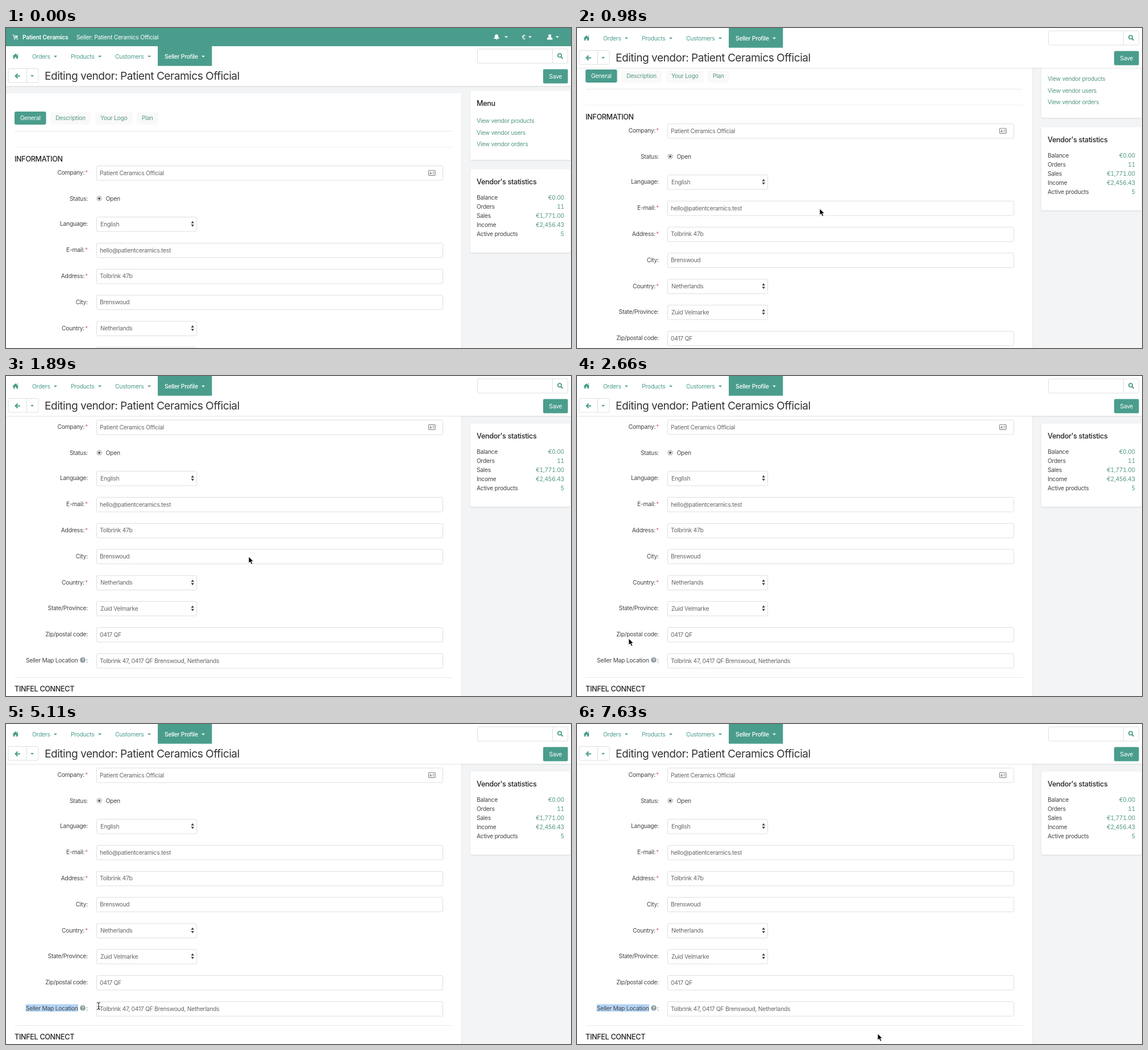
These frames come from a looping animation (994x563 px, 7.7 s). An HTML page:

```html
<!DOCTYPE html>
<html lang="en">
<head>
<meta charset="utf-8">
<title>Editing vendor</title>
<style>
  html, body { margin: 0; width: 100%; height: 100%; overflow: hidden; background: #f2f4f5; }
  svg { display: block; width: 100vw; height: 100vh; }
  text { font: 10.3px Inter, "Open Sans", sans-serif; letter-spacing: -.026em; fill: #444; white-space: pre; }
  .green { fill: #4a9d8c; }
  .link { fill: #559884; }
  .white { fill: #fff; }
  .value { fill: #666; }
  .number { font-variant-numeric: tabular-nums; }
  .medium { font-weight: 500; }
  .bold { font-weight: 600; }
  .heading { font-size: 12.6px; font-weight: 500; fill: #222; }
  .title { font-size: 19.1px; fill: #333; }
  .star { fill: #c77; }
  .box { fill: #fff; stroke: #dcdfe0; }
  .rule { stroke: #e6e8e9; }
  .card { fill: #fff; filter: drop-shadow(0 1px 1px #0000001c); }
</style>
</head>
<body>
<svg viewBox="0 0 994 563" preserveAspectRatio="none">
  <g id="page"></g>
  <g id="bar"></g>
  <g id="cursor">
    <circle id="press" cx=".3" cy=".3" r="26.7" fill="none" stroke="#111" stroke-width="1.4"/>
    <path id="arrow" d="M0 0V11.2L2.6 8.8L4.6 13.2L6.6 12.3L4.7 8.1H8.2Z" fill="#000" stroke="#fff" stroke-width=".7"/>
    <path id="beam" d="M-3-6Q0-6 0-4Q0-6 3-6M0-4V4M-3 6Q0 6 0 4Q0 6 3 6M-1.5 1.5H1.5" fill="none" stroke="#222" stroke-width="1.1"/>
    <path id="hand" d="M-1.4 0Q0-1.8 1.4 0V5L6 6Q7.7 6.5 7.4 8.5L6.4 14.5H-.4L-3.8 9.5Q-4.4 7.6-2.8 7.8L-1.4 9Z" fill="#fff" stroke="#111" stroke-width="1.1"/>
  </g>
</svg>
<script>
const LOOP = 7700, STEP = 70, BAR_SHIFT = 32;
const $ = id => document.getElementById(id);

const text = (x, y, str, cls = '', anchor = 'start') =>
  `<text x="${x}" y="${y}" class="${cls}" text-anchor="${anchor}">${str}</text>`;
const rect = (x, y, w, h, attrs, r = 0) =>
  `<rect x="${x}" y="${y}" width="${w}" height="${h}" rx="${r}" ${attrs}/>`;
const path = (d, attrs) => `<path d="${d}" ${attrs}/>`;
const caret = (x, y, fill) => path(`M${x - 3} ${y - 1.5}h6l-3 3z`, `fill="${fill}"`);
const rule = (y, x1 = 15, x2 = 784) => path(`M${x1} ${y}H${x2}`, 'class="rule"');

const GREEN = '#4a9d8c';
const brand = 'Patient Ceramics', vendor = brand + ' Official';

function field(label, y, value, { required, select } = {}) {
  const star = required ? '<tspan class="star" dx="1">*</tspan>' : '';
  return text(143.8, y + 3, label + ':' + star, '', 'end')
    + rect(159.5, y - 12.5, select ? 176 : 609, 25.5, 'class="box"', 2)
    + text(select ? 166 : 165, y + 3.5, value, 'value')
    + (select ? path(`M325.5 ${y - 1.4}h5.4l-2.7-4zM325.5 ${y + .8}h5.4l-2.7 4z`, 'fill="#444"') : '');
}

function buildPage() {
  const tabs = [['Description', 78, 71], ['Your Logo', 157, 65.5], ['Plan', 230, 37.5]];
  const links = ['products', 'users', 'orders'];
  const stats = [['Balance', '€0.00'], ['Orders', '11'], ['Sales', '€1,771.00'],
    ['Income', '€2,456.43'], ['Active products', '5']];
  return rect(0, 115, 801, 800, 'class="card"')
    + rect(15, 147, 55.5, 23, `fill="${GREEN}"`, 3)
    + text(42.7, 162.3, 'General', 'white', 'middle')
    + tabs.map(([name, x, w]) => rect(x, 148, w, 22, 'fill="#f9f9f9"', 3)
        + text(x + w / 2, 162.3, name, 'link', 'middle')).join('')
    + rule(181.5) + `<g opacity=".6">${rule(209.5)}</g>`
    + text(15, 235, 'INFORMATION', 'heading')
    + field('Company', 255, vendor, { required: true })
    + rect(743.5, 250.5, 11.5, 8.8, 'fill="none" stroke="#8a8a8a" stroke-width="1.2"', 1)
    + path('M745.5 257v-1.5q1.7-1.2 3.4 0v1.5zM746.3 253h1.8v1.8h-1.8zM750.3 253h3v1h-3zM750.3 255.5h3v1h-3z', 'fill="#888"')
    + text(143.8, 303.5, 'Status:', '', 'end')
    + '<circle cx="164" cy="300" r="4" fill="#fff" stroke="#999"/><circle cx="164" cy="300" r="2.1" fill="#555"/>'
    + text(175.5, 303.7, 'Open')
    + field('Language', 345, 'English', { select: true })
    + field('E-mail', 391, 'hello@patientceramics.test', { required: true })
    + field('Address', 436.8, 'Tolbrink 47b', { required: true })
    + field('City', 482.5, 'Brenswoud')
    + field('Country', 528.5, 'Netherlands', { required: true, select: true })
    + field('State/Province', 574, 'Zuid Velmarke', { select: true })
    + field('Zip/postal code', 620, '0417 QF')
    + field('', 666, 'Tolbrink 47, 0417 QF Brenswoud, Netherlands')
    + rect(34.5, 658, 0, 13, 'id="selection" fill="#b4d5f7"')
    + text(35, 668.5, 'Seller Map Location')
    + '<circle cx="135" cy="664.7" r="4.8" fill="#8c9aa0"/>'
    + '<text x="135" y="667.6" class="white bold" style="font-size:8px" text-anchor="middle">?</text>'
    + rule(695.5) + text(15, 720, 'TINFEL CONNECT', 'heading')
    + rect(817, 110.5, 176, 121.5, 'class="card"', 2)
    + text(828, 137, 'Menu', 'heading')
    + links.map((name, i) => text(828, 167.3 + i * 20.5, 'View vendor ' + name, 'link')).join('')
    + rect(817, 248.5, 176, 146.5, 'class="card"', 2)
    + text(828, 274.5, "Vendor's statistics", 'heading')
    + stats.map(([name, value], i) => text(828, 302 + i * 16, name)
        + text(982, 302 + i * 16, value, 'link number', 'end')).join('');
}

function buildBar() {
  const menus = [['Orders', 46, 87], ['Products', 114, 165], ['Customers', 192, 252]];
  return rect(0, 32, 994, 70, 'class="card"')
    + rect(0, 0, 994, 32, `fill="${GREEN}"`)
    + path('M11 12h2l1.6 6h6M13.5 13.5h7l-.8 3h-5.6z', 'fill="#cfe5df" stroke="#cfe5df"')
    + '<circle cx="15" cy="20" r="1" fill="#cfe5df"/><circle cx="20" cy="20" r="1" fill="#cfe5df"/>'
    + text(29, 19.7, brand, 'white bold')
    + text(124, 19.7, 'Seller: ' + vendor, 'white')
    + path('M858 19q2-1.5 2-4.5q0-2.8 3-3.5q3 .7 3 3.5q0 3 2 4.5zM861.5 19.8h3q-1.5 2.4-3 0z', 'fill="#fff"')
    + caret(880, 16, '#fff') + text(907.5, 19.7, '€', 'white medium') + caret(922, 16, '#fff')
    + '<circle cx="956.7" cy="13.6" r="2.6" fill="#fff"/>'
    + path('M952 20.5v-1.5q0-2.5 2.6-2.8h4.2q2.6.3 2.6 2.8v1.5z', 'fill="#fff"') + caret(970, 16, '#fff')
    + path('M11.5 49.7L16.7 45L22 49.7L21 50.4V54H18V51H15.5V54H12.7V50.4ZM19.5 45h1.5v3z', `fill="${GREEN}"`)
    + menus.map(([name, x, cx]) => text(x, 53.5, name, 'green') + caret(cx, 50.3, GREEN)).join('')
    + rect(267, 32, 95.3, 34.7, `fill="${GREEN}"`)
    + text(279, 53.5, 'Seller Profile', 'white medium') + caret(347, 50.3, '#fff')
    + rect(829.5, 37, 159, 25, 'class="box"', 2) + path('M961.5 37v25', 'stroke="#dcdfe0"')
    + `<circle cx="974" cy="48.3" r="3.2" fill="none" stroke="${GREEN}" stroke-width="1.7"/>`
    + path('M976.5 50.8l3 3', `stroke="${GREEN}" stroke-width="2"`)
    + rect(4, 71.5, 53, 24.5, 'class="box"', 2) + path('M36.5 71.5v24.5', 'stroke="#dcdfe0"')
    + path('M25 84.5H17M20.5 80.5L16.5 84.5L20.5 88.5', `fill="none" stroke="${GREEN}" stroke-width="2"`)
    + caret(46, 84.5, GREEN)
    + text(68, 91.2, 'Editing vendor: ' + vendor, 'title')
    + rect(945, 72.4, 43.5, 25, `fill="${GREEN}"`, 2)
    + text(966.7, 88.6, 'Save', 'white', 'middle');
}

function scrollAt(t) {
  if (t < 980) return 74 * (Math.max(0, t - 70) / 910) ** 2;
  if (t < 1400) return 74 + 63 * (t - 980) / 420;
  return 165 - 28 * (1 - Math.min(1, (t - 1400) / 560)) ** 3;
}

// time, x, y of the pointer's rests and turns
const route = [
  [70, 470, 580], [420, 427, 318], [2240, 427, 318], [2660, 91, 462], [3080, 46, 500],
  [3150, 36, 500], [3220, 36, 500], [3500, 127, 500], [4690, 127, 500], [5110, 163, 496],
  [5250, 163, 496], [5740, 255, 496], [6160, 186, 494], [6230, 186, 494], [6580, 278, 498],
  [6930, 278, 498], [7350, 385, 508], [7420, 385, 508], [7630, 529, 545]
];

function pointerAt(t) {
  const i = route.findIndex(p => p[0] > t);
  if (i < 0) return route.at(-1).slice(1);
  if (i === 0) return route[0].slice(1);
  const [t0, x0, y0] = route[i - 1], [t1, x1, y1] = route[i];
  const u = (t - t0) / (t1 - t0), k = u * u * (3 - 2 * u);
  return [x0 + (x1 - x0) * k, y0 + (y1 - y0) * k];
}

function shapeAt(t) {
  if (t < 2900 || t >= 7490) return 'arrow';
  return t >= 3500 && t < 4830 ? 'hand' : 'beam';
}

const show = (id, on) => $(id).setAttribute('visibility', on ? 'visible' : 'hidden');
const move = (id, x, y) => $(id).setAttribute('transform', `translate(${x} ${y})`);

function draw(now) {
  const t = Math.floor(now % LOOP / STEP) * STEP;
  const scroll = scrollAt(t), [x, y] = pointerAt(t), shape = shapeAt(t);
  move('page', 0, -scroll);
  move('bar', 0, -Math.min(scroll, BAR_SHIFT));
  move('cursor', x, y);
  for (const id of ['arrow', 'beam', 'hand']) show(id, id === shape && t >= 70);
  show('press', t >= 3290 && t < 4760);
  const end = t < 3290 ? 34.5 : t < 4760 ? Math.min(x, 115) : 127;
  $('selection').setAttribute('width', Math.max(0, end - 34.5));
}

$('page').innerHTML = buildPage();
$('bar').innerHTML = buildBar();
const start = performance.now();
function tick() {
  draw(performance.now() - start);
  requestAnimationFrame(tick);
}
tick();
</script>
</body>
</html>
```
